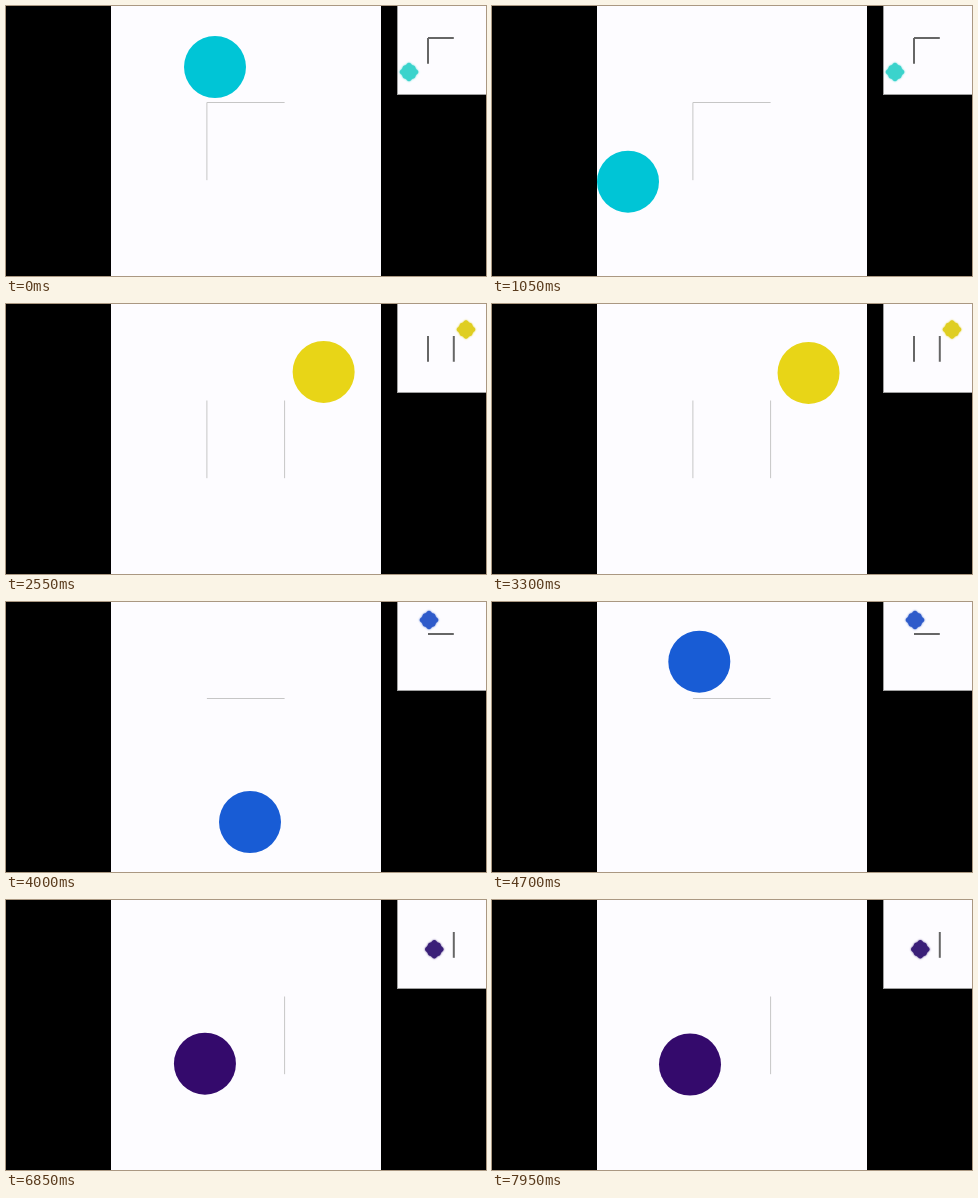
An HTML page with a canvas for the animation above (8000 ms loop, 480 by 270 pixels).

```html
<!DOCTYPE html>
<html lang="en">
<head>
<meta charset="utf-8">
<title>Ball placement</title>
<style>
html, body { margin: 0; width: 100%; height: 100%; overflow: hidden; background: #000; }
canvas { display: block; }
</style>
</head>
<body>
<canvas id="stage" width="480" height="270"></canvas>
<script>
const ctx = document.getElementById('stage').getContext('2d');
const TRIAL = 2000, STEP = 50, RADIUS = 31;
const DECAY = 5.5, SWING = 8; // per second
const FIELD = { x: 105, y: 0, size: 270 };
const INSET = { x: 391, y: 0, size: 89 };
const PAPER = '#fdfcff';

// The ball springs from start to rest; bend swings it sideways on the way.
const trials = [
  { color: '#00c5d6', goalColor: '#3bd3cc', goal: [403, 66], walls: ['left', 'top'],
    start: [209, 61], rest: [136, 175.5], bend: 0 },
  { color: '#e8d517', goalColor: '#dfce22', goal: [460, 25.5], walls: ['left', 'right'],
    start: [240, 140], rest: [316.5, 69], bend: 0 },
  { color: '#185cd5', goalColor: '#2f5bca', goal: [423, 18], walls: ['top'],
    start: [244, 220], rest: [204.5, 57], bend: -160 },
  { color: '#340a6c', goalColor: '#3a1f78', goal: [428.3, 49.3], walls: ['right'],
    start: [314, 61], rest: [198, 164.5], bend: 0 }
];

function ballPosition({ start, rest, bend }, seconds) {
  const fade = Math.exp(-DECAY * seconds);
  const swing = fade * Math.cos(SWING * seconds);
  const side = fade * Math.sin(SWING * seconds) * bend;
  const keepInside = (value, from) =>
    Math.min(Math.max(value, from + RADIUS), from + FIELD.size - RADIUS);
  return [
    keepInside(rest[0] + (start[0] - rest[0]) * swing + side, FIELD.x),
    keepInside(rest[1] + (start[1] - rest[1]) * swing, FIELD.y)
  ];
}

function square({ x, y, size }, color) {
  ctx.fillStyle = color;
  ctx.fillRect(x, y, size, size);
}

// Walls are sides of a square whose top left corner is at x, y.
function drawWalls(names, x, y, length, width, color) {
  ctx.strokeStyle = color;
  ctx.lineWidth = width;
  ctx.beginPath();
  for (const name of names) {
    const wallX = name === 'right' ? x + length : x;
    ctx.moveTo(wallX, y);
    if (name === 'top') ctx.lineTo(x + length, y);
    else ctx.lineTo(wallX, y + length);
  }
  ctx.stroke();
}

function drawBall([x, y], color) {
  ctx.fillStyle = color;
  ctx.beginPath();
  ctx.arc(x, y, RADIUS, 0, 2 * Math.PI);
  ctx.fill();
}

function drawGoal([x, y], color) {
  ctx.save();
  ctx.fillStyle = ctx.shadowColor = color;
  ctx.shadowBlur = 2;
  ctx.beginPath();
  for (let i = 0; i < 64; i++) {
    const angle = i * Math.PI / 32;
    const r = 8.2 + 0.6 * Math.cos(4 * angle) + 0.5 * Math.cos(8 * angle);
    ctx.lineTo(x + r * Math.cos(angle), y + r * Math.sin(angle));
  }
  ctx.fill();
  ctx.restore();
}

function draw(time) {
  const trial = trials[Math.floor(time / TRIAL)];

  ctx.fillStyle = '#000';
  ctx.fillRect(0, 0, 480, 270);
  square(FIELD, PAPER);
  drawWalls(trial.walls, 200.9, 96.5, 77.7, 1, '#c6c6c6');
  drawBall(ballPosition(trial, time % TRIAL / 1000), trial.color);

  square(INSET, '#a0a0a0');
  square({ x: INSET.x + 1, y: INSET.y, size: INSET.size - 1 }, PAPER);
  drawWalls(trial.walls, 422, 32, 25.8, 2, '#666');
  drawGoal(trial.goal, trial.goalColor);
}

function tick() {
  const time = performance.now() % (TRIAL * trials.length);
  draw(Math.floor(time / STEP) * STEP);
  requestAnimationFrame(tick);
}
tick();
</script>
</body>
</html>
```
